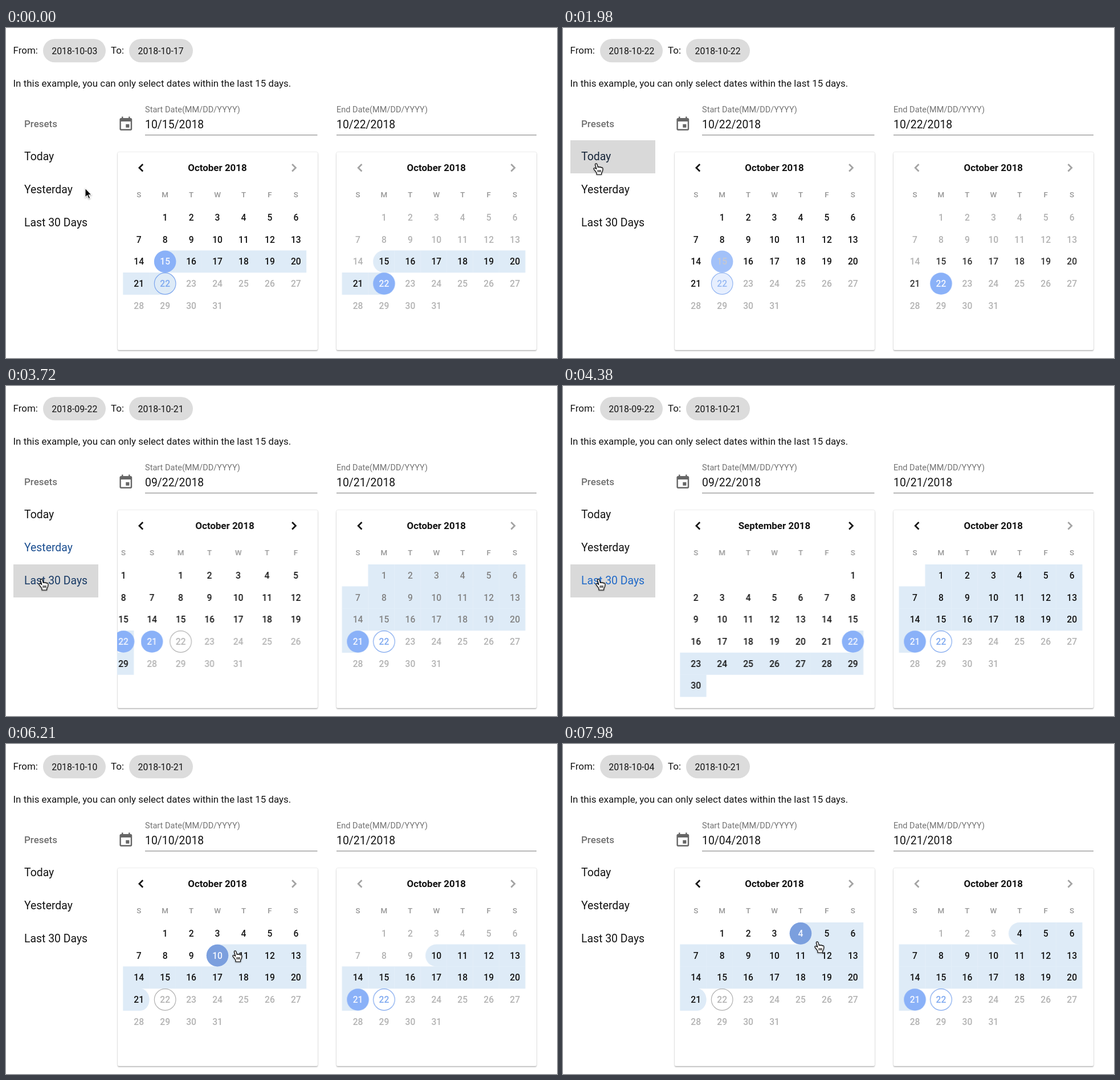
An HTML page for the animation above (8000 ms loop, 967 by 579 pixels).

```html
<!DOCTYPE html>
<html lang="en">
<head>
<meta charset="utf-8">
<title>Date range picker</title>
<style>
html, body { margin: 0; width: 100%; height: 100%; overflow: hidden; background: #fff; }
svg { position: absolute; left: 0; top: 0; }
text { font-family: Roboto, sans-serif; fill: #141414; font-size: 16.95px; }
.chip { font-size: 15.85px; text-anchor: middle; }
.label { font-size: 14.55px; fill: #737373; }
.input, .item { font-size: 19.4px; }
.presets { font-weight: 500; fill: #6e6e6e; }
.title { font-weight: 700; text-anchor: middle; }
.head { font-size: 13.4px; font-weight: 500; fill: #959595; text-anchor: middle; }
.day { font-size: 15.7px; font-weight: 500; text-anchor: middle; }
.card { position: absolute; top: 218px; width: 351.5px; height: 346.5px; border-radius: 2px; background: #fff;
  box-shadow: 0 2px 2px rgba(0,0,0,.2), 0 0 2px rgba(0,0,0,.26); }
</style>
</head>
<body>
<div class="card" style="left:195.5px"></div>
<div class="card" style="left:579.8px"></div>
<svg id="stage" width="967" height="579" viewBox="0 0 967 579">
  <clipPath id="cardClip"><rect x="195.5" y="218" width="351.5" height="347"/></clipPath>
  <clipPath id="titleClip"><rect x="258" y="225" width="226" height="40"/></clipPath>
</svg>
<script>
const T = 8000, FADE = 200;
const INK = '#141414', PALE = '#b3b3b3', BLUE = '#8ab1f8', RANGE = '#deebf7', LINK = '#1f69c8';
const CLICK = { today: 1940, yesterday: 2880, month: 3660, back: 4860, ten: 5880, four: 7690 };
const SLIDE = 360, SHIFT = 384.3, R = 19.3;
const stage = document.getElementById('stage');

function add(parent, tag, attrs, content) {
  const el = document.createElementNS('http://www.w3.org/2000/svg', tag);
  for (const k in attrs) el.setAttribute(k, attrs[k]);
  if (content !== undefined) el.textContent = content;
  parent.appendChild(el);
  return el;
}
const text = (parent, x, y, cls, str) => add(parent, 'text', { x, y, class: cls }, str);
const loop = (el, frames) => el.animate(frames, { duration: T, iterations: Infinity });

// Values change at the given times, over dur ms (0 is a hard change).
function track(el, prop, steps, dur = 0) {
  let last = steps[0][1];
  const frames = [{ offset: 0, [prop]: last }];
  el.style[prop] = last;
  for (const [t, v] of steps.slice(1)) {
    if (v === last) continue;
    frames.push({ offset: t / T, [prop]: last }, { offset: Math.min(1, (t + dur) / T), [prop]: v });
    last = v;
  }
  if (frames.length > 1) loop(el, [...frames, { offset: 1, [prop]: last }]);
}
function move(el, points) {
  loop(el, points.map(([t, x, y = 0]) =>
    ({ offset: t / T, transform: `translate(${x}px, ${y}px)`, easing: 'ease-in-out' })));
}
const during = (el, a, b) => track(el, 'opacity', [[0, 0], [a, 1], [b, 0]]);

// Text that is replaced at given times.
function swap(x, y, cls, list) {
  list.forEach(([t, str], i) => {
    const el = text(stage, x, y, cls, str), next = list[i + 1];
    const steps = t ? [[0, 0], [t, 1]] : [[0, 1]];
    if (next) steps.push([next[0], 0]);
    track(el, 'opacity', steps);
  });
}

// Selected ranges as days of October; a negative start lies in September.
const A = { start: 15, end: 22 }, B = { start: 22, end: 22 }, C = { start: 21, end: 21 };
const S = { start: -8, end: 21 }, D = { start: 10, end: 21 }, E = { start: 4, end: 21 };
const LEFT = [[0, A], [CLICK.today, B], [CLICK.yesterday, C], [CLICK.ten, D], [CLICK.four, E]];
const RIGHT = [...LEFT.slice(0, 3), [CLICK.month, S], [CLICK.back, C], ...LEFT.slice(3)];
const OCT = { first: 1, days: 31, today: 22 }, SEP = { first: 6, days: 30, today: 0 };

function rangeKind(day, s) {
  if (s.start === s.end || day < s.start || day > s.end) return '';
  return day === s.start ? 'start' : day === s.end ? 'end' : 'mid';
}
function rangePath(kind, cx, cy, pitch) {
  const l = cx - pitch / 2 - 5, r = cx + pitch / 2 - 4.6, y = cy - 19.5, h = 39;
  if (kind === 'mid') return `M${l} ${y}H${r}v${h}H${l}z`;
  if (kind === 'start') return `M${cx} ${y}H${r}v${h}H${cx}a${R} 19.5 0 0 1 0 ${-h}z`;
  return `M${l} ${y}H${r - 16}a16 19.5 0 0 1 0 ${h}H${l}z`;
}

function calendar(parent, month, states, right, pitch = 45.93) {
  const g = add(parent, 'g', {});
  const colX = c => 205.3 + pitch * (c + .5) + 5;
  [...'SMTWTFS'].forEach((d, c) => text(g, colX(c), 297, 'head', d));
  const under = add(g, 'g', {});
  for (let day = 1; day <= month.days; day++) {
    const slot = month.first + day - 1, cx = colX(slot % 7), cy = 332.4 + 38.7 * Math.floor(slot / 7);
    const isToday = day === month.today;
    const each = fn => states.map(([t, s]) => [t, fn(s)]);
    const picked = s => day === (right ? s.end : s.start);
    const enabled = s => right ? day >= s.start && day <= 22 : day <= s.end;
    for (const kind of ['mid', 'start', 'end']) {
      const steps = each(s => +(rangeKind(day, s) === kind));
      if (steps.some(p => p[1]))
        track(add(under, 'path', { d: rangePath(kind, cx, cy, pitch), fill: RANGE }), 'opacity', steps);
    }
    const disc = each(s => +picked(s));
    if (disc.some(p => p[1]))
      track(add(g, 'circle', { cx, cy, r: R, fill: BLUE }), 'opacity', disc, FADE);
    if (isToday) {
      const ring = add(g, 'circle', { cx, cy, r: 18.8, fill: 'none', 'stroke-width': 1.2 });
      track(ring, 'opacity', each(s => +!picked(s)), FADE);
      track(ring, 'stroke', each(s => enabled(s) ? '#7da6ee' : '#b0b0b0'), FADE);
    }
    if (!right && month === OCT && (day === 10 || day === 4) && states.length > 1) {
      const shade = add(g, 'circle', { cx, cy, r: R, fill: '#000' });
      track(shade, 'opacity', day === 10 ? [[0, 0], [5720, .1], [6210, 0]] : [[0, 0], [7480, .1]], FADE);
    }
    const label = text(g, cx, cy + (isToday ? 5.9 : 5.5), 'day', day);
    track(label, 'fill', each(s =>
      picked(s) ? '#f4f7ff' : !enabled(s) ? PALE : isToday ? '#7fa9f0' : INK), FADE);
  }
  return g;
}

function chevron(cx, dir, steps) {
  const el = add(stage, 'path', {
    d: 'M3.7-4.6L2-6.3-4.3 0 2 6.3 3.7 4.6-.9 0z',
    transform: `translate(${cx} 245.3) scale(${1.15 * dir} 1.15)`
  });
  track(el, 'fill', steps);
}

// Header row
for (const [x, w] of [[65, 110], [216, 112]])
  add(stage, 'rect', { x, y: 19.3, width: w, height: 41, rx: 20.5, fill: '#dcdcdc' });
text(stage, 12.5, 45, '', 'From:');
text(stage, 184, 45, '', 'To:');
text(stage, 12.5, 103, '', 'In this example, you can only select dates within the last 15 days.');
const iso = d => d < 0 ? '2018-09-22' : '2018-10-' + String(d).padStart(2, '0');
const us = d => iso(d).slice(5).replace('-', '/') + '/2018';
function dates(key, fmt, first) {
  const list = [];
  RIGHT.forEach(([t, s], i) => {
    const str = i ? fmt(s[key]) : first;
    if (!i || str !== list[list.length - 1][1]) list.push([t, str]);
  });
  return list;
}
swap(120.3, 46, 'chip', dates('start', iso, '2018-10-03'));
swap(271.6, 46, 'chip', dates('end', iso, '2018-10-17'));

// Input fields
const fields = [[244, 302.5, 'Start', 'start', us(15)], [580, 351, 'End', 'end', us(22)]];
for (const [x, w, name, key, first] of fields) {
  text(stage, x, 147.8, 'label', name + ' Date(MM/DD/YYYY)');
  swap(x, 175.6, 'input', dates(key, us, first));
  add(stage, 'rect', { x, y: 187.2, width: w, height: 1.2, fill: '#8a8a8a' });
}
add(stage, 'path', {
  d: 'M17 12h-5v5h5zM16 1v2H8V1H6v2H5c-1.1 0-2 .9-2 2v14c0 1.1.9 2 2 2h14c1.1 0 2-.9 2-2V5c0-1.1-.9-2-2-2h-1V1zM19 19H5V8h14z',
  transform: 'translate(195.8 154.3) scale(1.21)', fill: '#666', 'fill-rule': 'evenodd'
});

// Presets
text(stage, 32, 174, 'presets', 'Presets');
const items = [
  ['Today', [[0, 0], [1300, 1], [2770, 0]], [[0, INK], [CLICK.today, LINK], [CLICK.yesterday, INK]]],
  ['Yesterday', [[0, 0], [2770, 1], [3230, 0], [4650, 1], [5150, 0]],
    [[0, INK], [CLICK.yesterday, LINK], [CLICK.month, INK], [CLICK.back, LINK], [CLICK.ten, INK]]],
  ['Last 30 Days', [[0, 0], [3230, 1], [4650, 0]], [[0, INK], [CLICK.month - 30, LINK], [CLICK.back, INK]]]
];
items.forEach(([name, hover, color], i) => {
  const y = 197 + 58 * i;
  track(add(stage, 'rect', { x: 13, y, width: 149, height: 58, fill: '#d9d9d9' }), 'opacity', hover);
  track(text(stage, 32, y + 35.2, 'item', name), 'fill', color, FADE);
});

// Left calendar, with the month sliding out and back
const { month, back } = CLICK, NARROW = 321.5, WIDE = 353.5, HEAD = 226;
const leftCard = add(stage, 'g', { 'clip-path': 'url(#cardClip)' });
const titles = add(stage, 'g', { 'clip-path': 'url(#titleClip)' });
const returning = w => [[0, 0], [back, 0], [back, w], [back + SLIDE, 0], [T, 0]];
const coming = w => [[0, -w], [month, -w], [month + SLIDE, 0], [T, 0]];
const leaving = (t, w) => [[0, 0], [t, 0], [t + SLIDE, w], [T, w]];
const hiddenMid = [[0, 1], [month, 0], [back, 1]];
const SEP_STATE = [[0, { start: 22, end: 99 }]];

const sepOut = calendar(leftCard, SEP, SEP_STATE, false, 50.5);
during(sepOut, back, back + SLIDE);
move(sepOut, leaving(back, -WIDE));
const octOut = calendar(leftCard, OCT, [[0, C]], false, 50.5);
during(octOut, month, month + SLIDE);
move(octOut, leaving(month, WIDE));
const sepIn = calendar(leftCard, SEP, SEP_STATE, false);
during(sepIn, month, back);
move(sepIn, coming(NARROW));
const oct = calendar(leftCard, OCT, LEFT, false);
track(oct, 'opacity', hiddenMid);
move(oct, returning(NARROW));

const octTitle = text(titles, 371, 251.3, 'title', 'October 2018');
track(octTitle, 'opacity', [[0, 1], [month + SLIDE, 0], [back, 1]]);
move(octTitle, [[0, 0], [month, 0], [month + SLIDE, HEAD], [back, HEAD], [back + SLIDE, 0], [T, 0]]);
const sepTitle = text(titles, 371, 251.3, 'title', 'September 2018');
during(sepTitle, month, back + SLIDE);
move(sepTitle, [[0, -HEAD], [month, -HEAD], [month + SLIDE, 0], [back, 0], [back + SLIDE, -HEAD], [T, -HEAD]]);

// Right calendar
const rightCard = add(stage, 'g', { transform: `translate(${SHIFT} 0)` });
calendar(rightCard, OCT, RIGHT, true);
text(rightCard, 371, 251.3, 'title', 'October 2018');

const open = [[0, '#a3a3a3'], [month, INK], [back, '#a3a3a3']];
chevron(236.9, 1, [[0, INK]]);
chevron(505.4, -1, open);
chevron(236.9 + SHIFT, 1, open);
chevron(505.4 + SHIFT, -1, [[0, '#a3a3a3']]);

// Pointer: an arrow first, a hand over clickable things
const pointer = add(stage, 'g', { style: 'filter: drop-shadow(0 1px 1px rgba(0,0,0,.35))' });
const arrow = add(pointer, 'path', {
  d: 'M0 0V16.2L3.7 12.8 6.2 18.6 8.8 17.5 6.3 11.8H11.3z',
  fill: '#000', stroke: '#fff', 'stroke-width': 1.1
});
const hand = add(pointer, 'g', { stroke: '#000', 'stroke-width': 1.2, 'stroke-linejoin': 'round' });
add(hand, 'path', {
  d: 'M5 .9C3.7 1 3.3 2.3 3.7 3.5L5.8 10.4 3.4 8.8C1.8 8 .4 9.2 1.2 10.6L6 17V20H14.6V17.4C17 14.2 17.2 11 16.6 8.6 16.2 7.3 14.5 7.3 14 8.3 13.7 6.6 11.8 6.4 11.1 7.6 10.5 6.3 8.8 6.4 8.4 7.5L6.8 2.2C6.5 1.2 5.8.8 5 .9z',
  fill: '#fff'
});
add(hand, 'path', { d: 'M8.3 12V16M10.6 12V16M12.9 12V16', fill: 'none' });
const arrowTimes = [[0, 1], [1300, 0], [5150, 1], [5420, 0]];
track(arrow, 'opacity', arrowTimes);
track(hand, 'opacity', arrowTimes.map(([t, v]) => [t, 1 - v]));
move(pointer, [
  [0, 139, 281], [30, 139, 281], [90, 125, 279], [330, 125, 279], [700, 86, 303], [1050, 78, 284],
  [1140, 78, 280], [1600, 54, 238], [1980, 53, 237], [2500, 55, 239], [2850, 64, 280], [2950, 64, 283],
  [3180, 62, 309], [3500, 57, 338], [4440, 57, 338], [4780, 70, 290], [5040, 71, 289], [5250, 190, 312],
  [5750, 364, 364], [5950, 364, 364], [6210, 397, 362], [6700, 440, 352], [7000, 440, 350],
  [7560, 412, 330], [7700, 412, 330], [7960, 441, 346], [T, 441, 346]
]);
</script>
</body>
</html>
```
